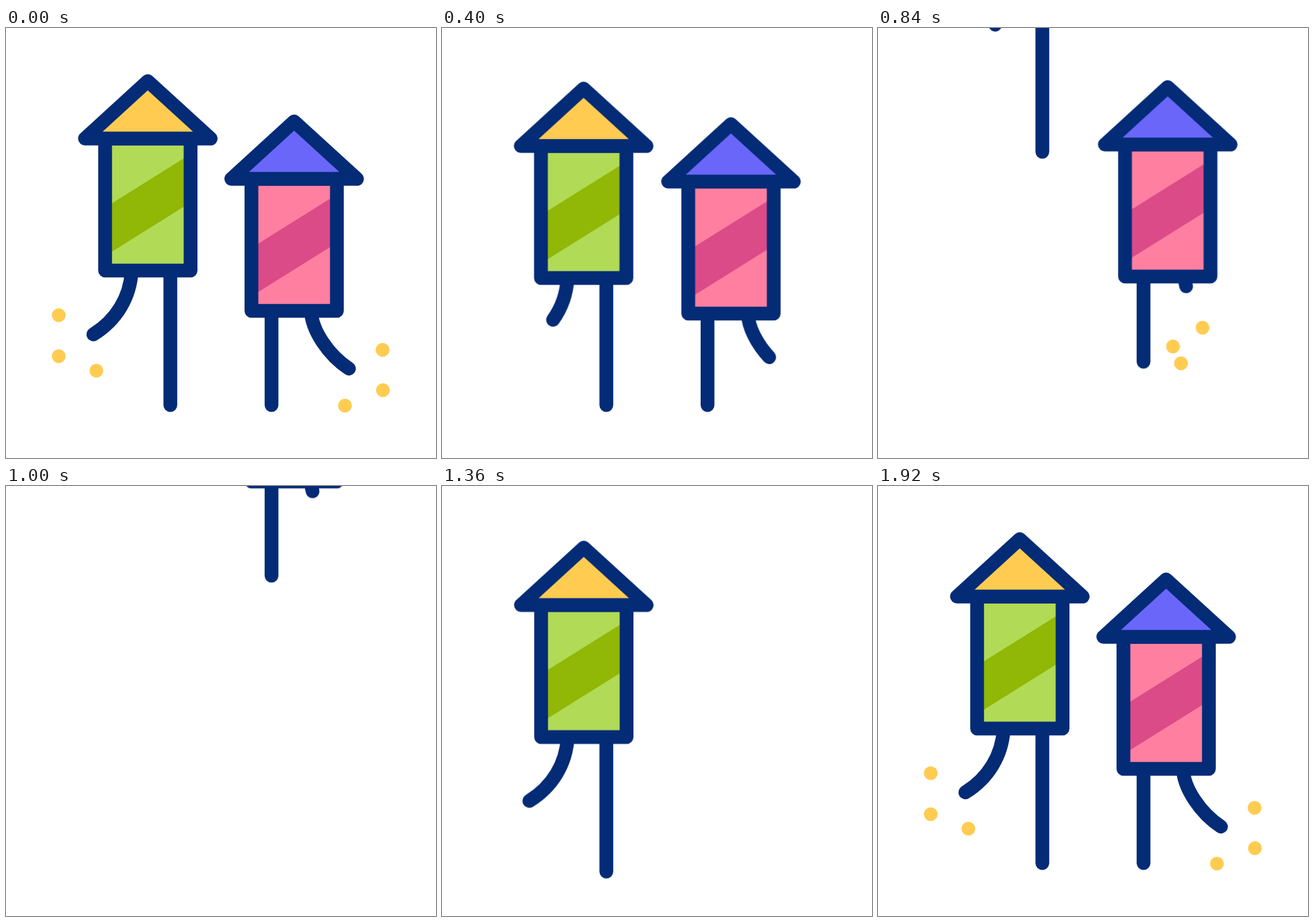
An HTML page without scripts for the animation above (2000 ms loop, 640 by 640 pixels).

```html
<!DOCTYPE html>
<html lang="en">
<head>
<meta charset="utf-8">
<title>Fireworks</title>
<style>
html, body { margin: 0; width: 100%; height: 100%; overflow: hidden; background: #fff; }
svg { display: block; width: 100%; height: 100%; }

.line { fill: none; stroke: #042b76; stroke-width: 20.5; stroke-linecap: round; stroke-linejoin: round; }
.case { fill: var(--case); }
.band { fill: var(--band); }
.roof { fill: var(--roof); }
.left { --case: #b1da56; --band: #91b707; --roof: #ffcc51; }
.right { --case: #ff7fa1; --band: #db4b87; --roof: #6966f9; }

.fly, .shake, .fuse, .spark { animation: 2s linear infinite; }
.left .fly { animation-name: fly-left; }
.right .fly { animation-name: fly-right; }
.left .shake { animation-name: shake-left; }
.right .shake { animation-name: shake-right; }
.fuse { stroke-dasharray: 101 200; }
.left .fuse { animation-name: burn-left; }
.right .fuse { animation-name: burn-right; }

/* lift off, then come back in from below */
@keyframes fly-left {
  0% { transform: none; }
  29.77% { transform: translateY(0); animation-timing-function: cubic-bezier(.3333, 0, .6667, .3333); }
  45.77%, 54.43% { transform: translateY(-640px); }
  54.44% { transform: translateY(640px); animation-timing-function: cubic-bezier(.3333, 1, .6667, 1); }
  73.09%, 100% { transform: translateY(0); }
}
@keyframes fly-right {
  0% { transform: none; }
  36.97% { transform: translateY(0); animation-timing-function: cubic-bezier(.3333, 0, .6667, .3333); }
  52.97%, 70.72% { transform: translateY(-640px); }
  70.73% { transform: translateY(640px); animation-timing-function: cubic-bezier(.3333, 1, .6667, 1); }
  89.38%, 100% { transform: translateY(0); }
}

/* rattle while the body sinks on its stick */
@keyframes shake-left {
  0%, 2% { transform: translate(0, 0); }
  6% { transform: translate(8px, -6px); }
  10% { transform: translate(-9.5px, 6.5px); }
  14% { transform: translate(9px, 4px); }
  18% { transform: translate(-10px, 8px); }
  22% { transform: translate(9px, 14px); }
  26% { transform: translate(-10px, 26px); }
  30% { transform: translate(4px, 46px); }
  34% { transform: translate(9px, 22px); }
  38% { transform: translate(-9px, 6px); }
  42% { transform: translate(-11px, -4px); }
  46%, 100% { transform: translate(0, 0); }
}
@keyframes shake-right {
  0%, 6% { transform: translate(0, 0); }
  10% { transform: translate(-5px, .5px); }
  14% { transform: translate(7px, -2px); }
  18% { transform: translate(-8px, 3px); }
  22% { transform: translate(10px, 5px); }
  26% { transform: translate(-11px, 9px); }
  30% { transform: translate(11.5px, 15.5px); }
  34% { transform: translate(-11px, 30px); }
  38% { transform: translate(12px, 46px); }
  42% { transform: translate(2.5px, 13.5px); }
  46% { transform: translate(-8px, 4px); }
  49%, 100% { transform: translate(0, 0); }
}

@keyframes burn-left {
  0%, 5% { stroke-dashoffset: 0; }
  10% { stroke-dashoffset: 14; }
  30% { stroke-dashoffset: 72; }
  36%, 50% { stroke-dashoffset: 88; }
  50.1%, 100% { stroke-dashoffset: 0; }
}
@keyframes burn-right {
  0%, 10% { stroke-dashoffset: 0; }
  30% { stroke-dashoffset: 63; }
  38%, 60% { stroke-dashoffset: 87; }
  60.1%, 100% { stroke-dashoffset: 0; }
}

/* --o: at the fuse tip, --p and --q: two bursts */
.spark { fill: #ffcc51; animation-timing-function: linear, step-end; }
.left .spark { animation-name: burst-left, var(--blink); }
.right .spark { animation-name: burst-right, var(--blink); }
@keyframes burst-left {
  0%, 17.9% { transform: none; }
  18%, 22% { transform: translate(var(--o)); }
  28%, 31.9% { transform: translate(var(--p)); }
  32% { transform: translate(var(--o)); }
  40%, 50% { transform: translate(var(--q)); }
  50.1%, 100% { transform: none; }
}
@keyframes burst-right {
  0%, 20.9% { transform: none; }
  21%, 26% { transform: translate(var(--o)); }
  30%, 34% { transform: translate(var(--p)); }
  38% { transform: translate(var(--o)); }
  42%, 60% { transform: translate(var(--q)); }
  60.1%, 100% { transform: none; }
}
@keyframes la { 0% { opacity: 1; } 8% { opacity: 0; } 22% { opacity: 1; } 28% { opacity: 0; } 32% { opacity: 1; } 40% { opacity: 0; } 72% { opacity: 1; } }
@keyframes lb { 0% { opacity: 1; } 12% { opacity: 0; } 22% { opacity: 1; } 28% { opacity: 0; } 32% { opacity: 1; } 40% { opacity: 0; } 74% { opacity: 1; } }
@keyframes lc { 0% { opacity: 1; } 14% { opacity: 0; } 22% { opacity: 1; } 28% { opacity: 0; } 32% { opacity: 1; } 40% { opacity: 0; } 76% { opacity: 1; } }
@keyframes ra { 0% { opacity: 1; } 16% { opacity: 0; } 26% { opacity: 1; } 34% { opacity: 0; } 38% { opacity: 1; } 46% { opacity: 0; } 82% { opacity: 1; } }
@keyframes rb { 0% { opacity: 1; } 18% { opacity: 0; } 26% { opacity: 1; } 34% { opacity: 0; } 38% { opacity: 1; } 46% { opacity: 0; } 84% { opacity: 1; } }
@keyframes rc { 0% { opacity: 1; } 20% { opacity: 0; } 26% { opacity: 1; } 34% { opacity: 0; } 38% { opacity: 1; } 46% { opacity: 0; } 86% { opacity: 1; } }
</style>
</head>
<body>
<svg viewBox="0 0 640 640">
  <defs>
    <g id="body">
      <path class="case" d="M147.5 164.5H274.7V361H147.5Z"/>
      <path class="band" d="M147.5 267.3L274.7 187.7V259.7L147.5 339.3Z"/>
      <path class="line" d="M147.5 164.5H274.7V361H147.5Z"/>
      <path class="roof" d="M211 79L304.7 164.5H117.5Z"/>
      <path class="line" d="M211 79L304.7 164.5H117.5Z"/>
    </g>
  </defs>

  <g class="left">
    <circle class="spark" cx="78.5" cy="427.5" r="10.3" style="--blink:la; --o:100px,3px; --p:32px,18px; --q:77px,-33px"/>
    <circle class="spark" cx="78.5" cy="488.5" r="10.3" style="--blink:lb; --o:100px,-58px; --p:15px,-8px; --q:90px,-40px"/>
    <circle class="spark" cx="134.5" cy="510" r="10.3" style="--blink:lc; --o:46px,-80px; --p:15px,-5px; --q:65px,-85px"/>
    <g class="fly">
      <path class="line" d="M244.6 361V561.3"/>
      <g class="shake">
        <path class="line fuse" pathLength="100" d="M187 361C185 401 164 435 130 456"/>
        <use href="#body"/>
      </g>
    </g>
  </g>

  <g class="right">
    <circle class="spark" cx="560.5" cy="479" r="10.3" style="--blink:ra; --o:-90px,-1px; --p:-73px,-24px; --q:-77.5px,-33px"/>
    <circle class="spark" cx="561" cy="539" r="10.3" style="--blink:rb; --o:-91px,-61px; --p:-83px,-34px; --q:-110px,-40px"/>
    <circle class="spark" cx="504.5" cy="562" r="10.3" style="--blink:rc; --o:-34px,-84px; --p:-50px,-20px; --q:-65.5px,-88px"/>
    <g class="fly">
      <path class="line" d="M395.2 421V561.3"/>
      <g class="shake">
        <path class="line fuse" pathLength="100" d="M454 421C455 450 480 487 510.5 507"/>
        <use href="#body" x="217.8" y="60"/>
      </g>
    </g>
  </g>
</svg>
</body>
</html>
```
